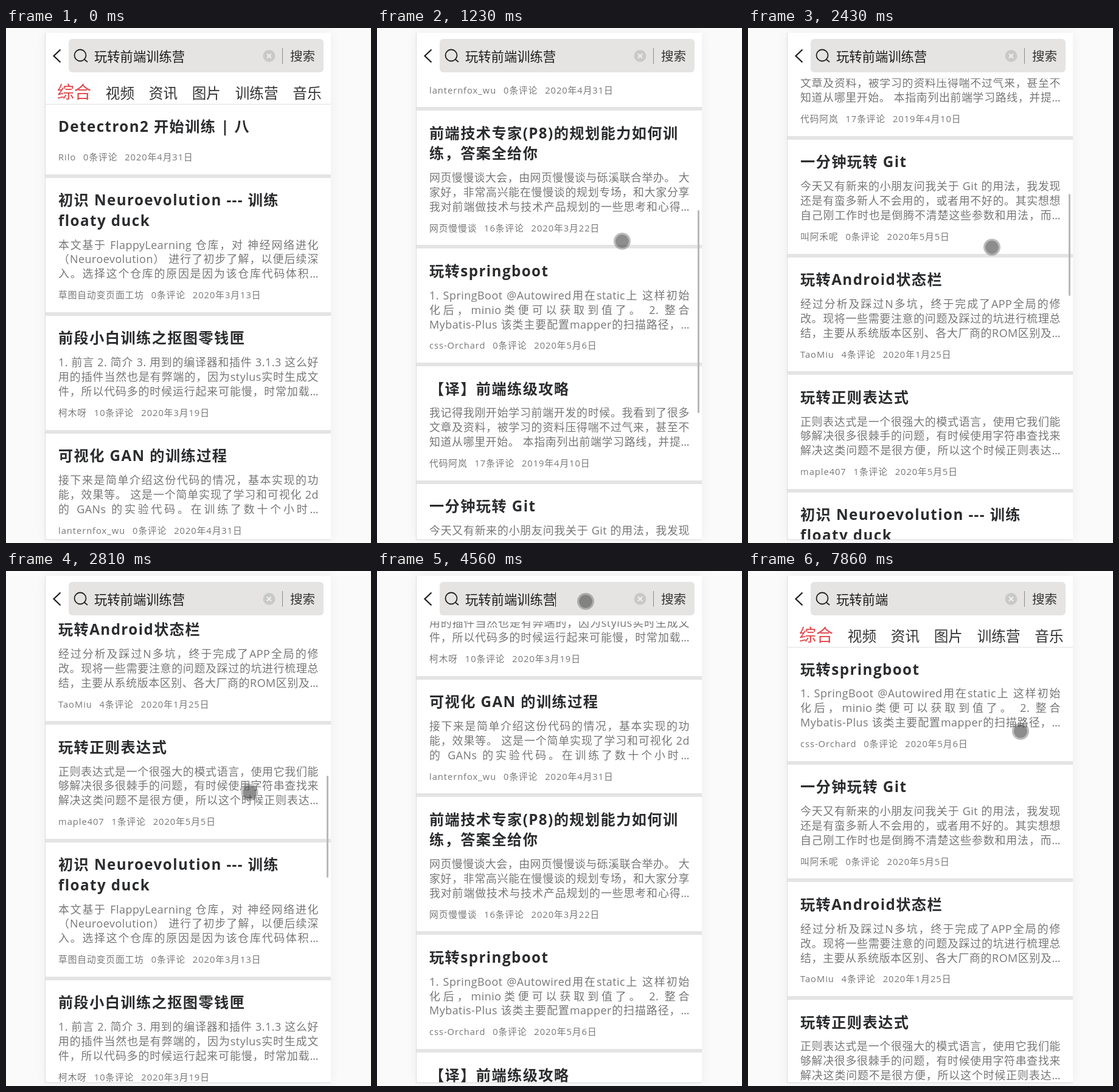
These frames come from a looping animation (600 px wide and 848 px high, 8 s). An HTML page:

```html
<!DOCTYPE html>
<html lang="zh-CN">
<head>
<meta charset="utf-8">
<title>搜索结果</title>
<style>
  html, body { margin: 0; width: 100%; height: 100%; overflow: hidden; background: #fafafa; }
  body { position: relative; font-family: "Open Sans", "Noto Sans CJK SC", "Noto Sans CJK", sans-serif; white-space: nowrap; }
  body > div, body > svg, .list, .query, .go { position: absolute; }
  .phone { left: 64px; top: 8px; width: 469px; height: 834px; background: #fff; border: solid #dcdcdc; border-width: 0 0 1px 1px; box-shadow: 0 0 18px rgba(0,0,0,.055); }
  .view { left: 65px; top: 83px; width: 469px; height: 759px; overflow: hidden; }
  .list { left: 0; top: 0; width: 100%; }
  .post { display: flex; flex-direction: column; padding: 19.5px 20px 18.7px 21px; border-bottom: 6px solid #e4e4e4; }
  .post h2 { margin: 0; font: 700 24.2px/33.3px "Open Sans", "Noto Sans CJK SC", "Noto Sans CJK", sans-serif; letter-spacing: 1.42px; color: #2b2c2e; }
  .desc { margin-top: 12.5px; font-size: 17.9px; line-height: 23.9px; letter-spacing: .5px; color: #777; }
  .desc div { text-align: justify; text-align-last: justify; }
  .meta { display: flex; gap: 11.8px; margin-top: 12px; font-size: 14.7px; line-height: 20px; letter-spacing: .97px; color: #777; }
  .header { left: 65px; top: 9px; width: 469px; height: 74px; background: #fff; }
  .field { left: 103px; top: 18px; width: 419px; height: 55px; border-radius: 6px; background: #e5e4e3; line-height: 55px; color: #1c1c1c; }
  .query { left: 42px; top: 1px; font-size: 21.3px; }
  .go { left: 364px; top: 1px; font-size: 20.6px; color: #333; }
  .tabs { left: 65px; top: 83px; width: 450px; height: 42px; padding-left: 19px; display: flex; gap: 23.8px; background: #fff; border-bottom: 1px solid #e0e0e0; font-size: 23.6px; line-height: 48px; color: #333; }
  .tabs b { font-weight: 400; font-size: 28px; line-height: 44px; color: #e2474b; }
  .caret { top: 35px; width: 1px; height: 24px; background: #222; }
  .bar { left: 527px; top: 0; width: 3px; border-radius: 2px; background: #b9b9b9; }
  .cursor { left: -14px; top: -14px; width: 22px; height: 22px; border: 3px solid rgba(90,90,90,.4); border-radius: 50%; background: rgba(60,60,60,.58) padding-box; }
</style>
</head>
<body>
<div class="phone"></div>
<div class="view"><div class="list" id="feed"></div><div class="list" id="results"></div></div>
<div class="header"></div>
<div class="field"><span class="query" id="query"></span><span class="go">搜索</span></div>
<svg width="600" height="90" style="left:0;top:0" fill="none" stroke="#222" stroke-width="2">
  <path d="M89.500 35.500L78.500 46L89.500 56.500" stroke-width="2.300"/>
  <circle cx="122" cy="45" r="9.500" stroke-width="1.800"/>
  <path d="M128.500 51.500L134 56" stroke-width="1.800"/>
  <circle cx="432.500" cy="46" r="10" fill="#c9c9c9" stroke="none"/>
  <path d="M429 42.500l7 7m0-7l-7 7" stroke="#f2f2f2" stroke-width="1.800"/>
  <path d="M454.500 33v26" stroke="#8c8c8c" stroke-width="1"/>
</svg>
<div class="tabs" id="tabs"><b>综合</b><span>视频</span><span>资讯</span><span>图片</span><span>训练营</span><span>音乐</span></div>
<div class="caret" id="caret"></div>
<div class="bar" id="bar"></div>
<div class="cursor" id="cursor"></div>
<script>
const LOOP = 8000, STEP = 70, TABS_HEIGHT = 42;
const $ = id => document.getElementById(id);

// title;description;author;comments;date, where "/" breaks a line
const posts = `
Detectron2 开始训练 | 八;;Rilo;0;2020年4月31日
初识 Neuroevolution --- 训练/floaty duck;本文基于 FlappyLearning 仓库，对 神经网络进化/（Neuroevolution） 进行了初步了解，以便后续深/入。选择这个仓库的原因是因为该仓库代码体积…;草图自动变页面工坊;0;2020年3月13日
前段小白训练之抠图零钱匣;1. 前言 2. 简介 3. 用到的编译器和插件 3.1.3 这么好/用的插件当然也是有弊端的，因为stylus实时生成文/件，所以代码多的时候运行起来可能慢，时常加载…;柯木呀;10;2020年3月19日
可视化 GAN 的训练过程;接下来是简单介绍这份代码的情况，基本实现的功/能，效果等。 这是一个简单实现了学习和可视化 2d/的 GANs 的实验代码。在训练了数十个小时…;lanternfox_wu;0;2020年4月31日
前端技术专家(P8)的规划能力如何训/练，答案全给你;网页慢慢谈大会，由网页慢慢谈与砾溪联合举办。 大/家好，非常高兴能在慢慢谈的规划专场，和大家分享/我对前端做技术与技术产品规划的一些思考和心得…;网页慢慢谈;16;2020年3月22日
玩转springboot;1. SpringBoot @Autowired用在static上 这样初始/化后，minio类便可以获取到值了。 2. 整合/Mybatis-Plus 该类主要配置mapper的扫描路径，…;css-Orchard;0;2020年5月6日
【译】前端练级攻略;我记得我刚开始学习前端开发的时候。我看到了很多/文章及资料，被学习的资料压得喘不过气来，甚至不/知道从哪里开始。 本指南列出前端学习路线，并提…;代码阿岚;17;2019年4月10日
一分钟玩转 Git;今天又有新来的小朋友问我关于 Git 的用法，我发现/还是有蛮多新人不会用的，或者用不好的。其实想想/自己刚工作时也是倒腾不清楚这些参数和用法，而…;叫阿禾呢;0;2020年5月5日
玩转Android状态栏;经过分析及踩过N多坑，终于完成了APP全局的修/改。现将一些需要注意的问题及踩过的坑进行梳理总/结，主要从系统版本区别、各大厂商的ROM区别及…;TaoMiu;4;2020年1月25日
玩转正则表达式;正则表达式是一个很强大的模式语言，使用它我们能/够解决很多很棘手的问题，有时候使用字符串查找来/解决这类问题不是很方便，所以这个时候正则表达…;maple407;1;2020年5月5日
`.trim().split("\n").map(row => row.split(";"));

const lines = text => text ? text.split("/").map(line => `<div>${line}</div>`).join("") : "";
const card = ([title, desc, author, comments, date]) => `<div class="post"><h2>${lines(title)}</h2>
  <div class="desc">${lines(desc)}</div>
  <div class="meta"><span>${author}</span><span>${comments}条评论</span><span>${date}</span></div></div>`;

$("feed").innerHTML = [...posts, ...posts.slice(1)].map(card).join("");
$("results").innerHTML = [5, 7, 8, 9].map(i => card(posts[i])).join("");

// Keys are [time, ...values]
const scrollKeys = [[530, 0], [880, 417], [950, 417], [1540, 1066], [1680, 1219], [2220, 1219],
  [2430, 1292], [3150, 1947], [3290, 2299]];
const cursorKeys = [[130, 533, 23], [410, 403, 351], [2220, 403, 351], [2430, 401, 361], [3150, 400, 368],
  [3620, 400, 368], [4250, 343, 50], [6050, 343, 50], [6400, 415, 59], [6680, 486, 41],
  [7230, 486, 41], [7860, 448, 264]];
const tabKeys = [[530, 0], [880, 1], [7230, 1], [7580, 0]];

// Linear between keys, advancing in discrete steps
function track(keys, t) {
  const next = keys.findIndex(key => key[0] > t);
  if (next === 0) return keys[0].slice(1);
  if (next < 0) return keys[keys.length - 1].slice(1);
  const a = keys[next - 1], b = keys[next];
  const p = Math.floor((t - a[0]) / STEP) * STEP / (b[0] - a[0]);
  return a.slice(1).map((v, i) => v + (b[i + 1] - v) * p);
}

const within = (t, ...spans) => spans.some(([from, to]) => t >= from && t < to);
const show = (id, on) => { $(id).style.visibility = on ? "visible" : "hidden"; };
const move = (id, x, y) => { $(id).style.transform = `translate(${x}px, ${y}px)`; };

function render(t) {
  const [scroll] = track(scrollKeys, t), [hidden] = track(tabKeys, t), [x, y] = track(cursorKeys, t);
  const searched = t >= 6970;

  show("feed", !searched);
  show("results", searched);
  move("feed", 0, Math.round(TABS_HEIGHT - scroll));
  move("results", 0, Math.round(TABS_HEIGHT * (1 - hidden)));

  move("tabs", 0, -78 * hidden);
  $("tabs").style.opacity = 1 - hidden;

  const secondPage = t >= 2220;
  show("bar", within(t, [600, 2150], [2290, 3760]));
  $("bar").style.height = (secondPage ? 168 : 334) + "px";
  move("bar", 0, Math.round(secondPage ? 12.8 + 0.2015 * scroll : 10 + 0.4004 * scroll));

  const count = 7 - [5320, 5520, 5730].filter(time => t >= time).length;
  $("query").textContent = "玩转前端训练营".slice(0, count);
  show("caret", within(t, [4560, 4950], [5320, 6320], [6600, 6830]));
  $("caret").style.left = Math.floor(144 + 21.3 * count) + "px";

  show("cursor", t >= 130);
  move("cursor", x, y);
}

const start = performance.now();
function frame() {
  render((performance.now() - start) % LOOP);
  requestAnimationFrame(frame);
}
frame();
</script>
</body>
</html>
```
